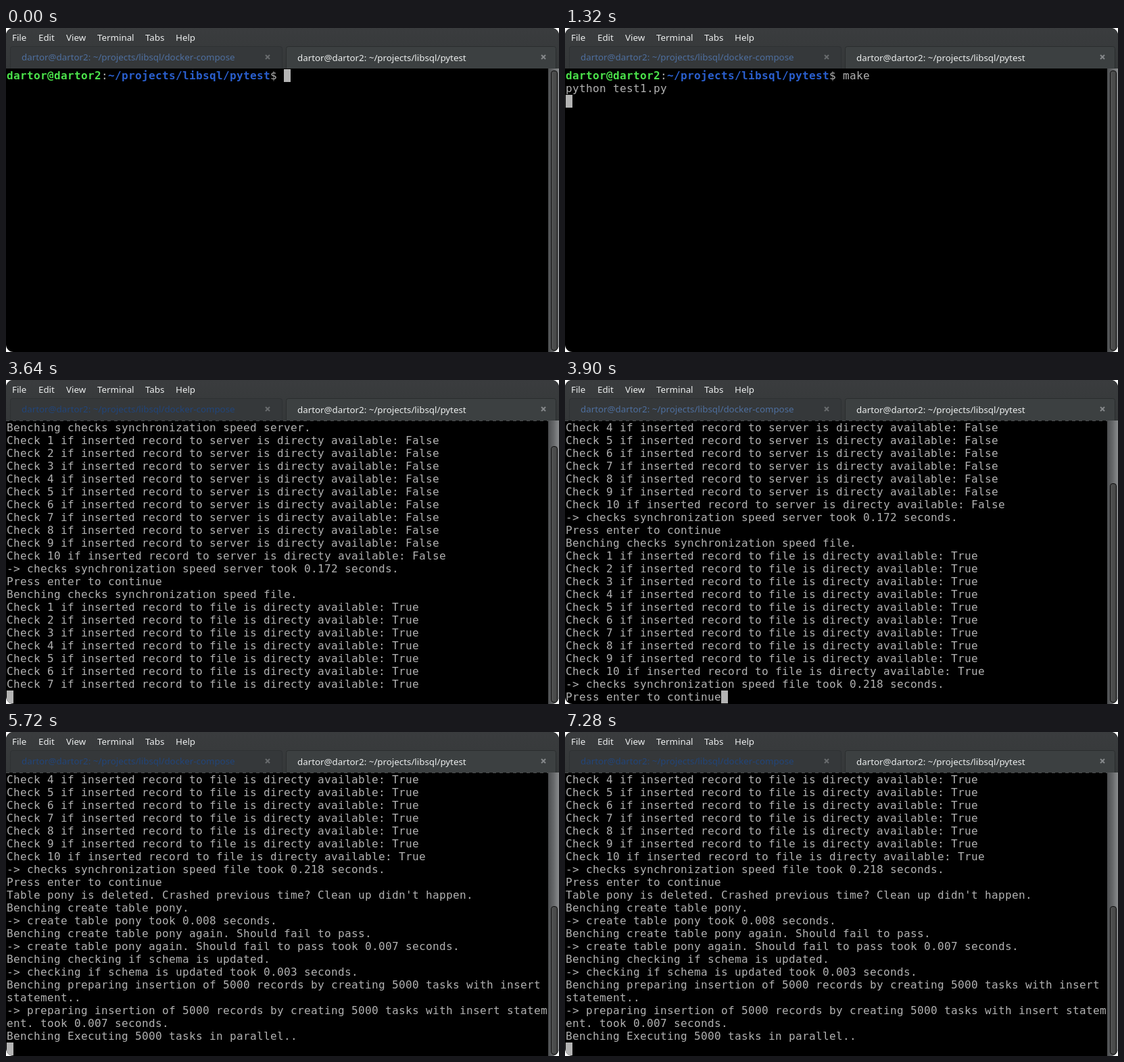
Animation of 818x480 px, one loop 8000 ms. Source, as an HTML page:

```html
<!DOCTYPE html>
<html lang="en">
<head>
<meta charset="utf-8">
<title>Terminal</title>
<style>
  html, body { margin: 0; width: 100%; height: 100%; overflow: hidden; background: #fff; }
  #win { position: absolute; left: 0; top: 0; width: 818px; height: 480px; overflow: hidden; border-radius: 11px; background: #000; }
  #win > * { position: absolute; }
  #head { left: 0; top: 0; font: 13.333px "Noto Sans", sans-serif; fill: #eceeee; }
  #screen { left: 0; top: 61px; width: 802px; height: 419px; overflow: hidden; }
  #log { position: absolute; left: 1px; top: 0; white-space: pre; color: #b2b2b2;
         font: 16px/19px "DejaVu Sans Mono", monospace; }
  #log div { height: 19px; }
  #log b { color: #4be34b; }
  #log b + b, #log .path { color: #2a5fce; }
  #cursor { position: absolute; width: 10px; height: 19px; background: #b4b4b4; }
  #edge { left: 0; top: 60px; width: 802px; height: 1px;
          background: repeating-linear-gradient(90deg, #4a4c4d 0 5px, #0a0a0a 5px 10px); }
  #trough { left: 802px; top: 60px; width: 16px; height: 420px;
            background: linear-gradient(90deg, #4c4e50, #66686a 50%, #8a8c8e); }
  #thumb { left: 806px; width: 10px; box-sizing: border-box; border: 1px solid #0c0c0c;
           border-radius: 4px; background: linear-gradient(90deg, #515252, #454646); }
</style>
</head>
<body>
<div id="win">
  <svg id="head" width="818" height="60">
    <defs>
      <linearGradient id="bar" x2="0" y2="1">
        <stop offset="0" stop-color="#3a3c3e"/>
        <stop offset="1" stop-color="#353839"/>
      </linearGradient>
    </defs>
    <rect width="818" height="60" fill="url(#bar)"/>
    <path d="M6.5 60V30.500q0-3 3-3H405.500q3 0 3 3V60" fill="#35383a" stroke="#2e3133"/>
    <path d="M414.500 60V30.500q0-3 3-3H810.500q3 0 3 3V60" fill="#3c4041" stroke="#2a2d2e"/>
    <text x="9" y="19">File</text>
    <text x="48" y="19">Edit</text>
    <text x="89" y="19">View</text>
    <text x="135" y="19">Terminal</text>
    <text x="206" y="19">Tabs</text>
    <text x="251" y="19">Help</text>
    <text id="idle" x="23" y="48">dartor@dartor2: ~/projects/libsql/docker-compose</text>
    <text x="431" y="49">dartor@dartor2: ~/projects/libsql/pytest</text>
    <path d="M384 40l6 6m0-6l-6 6" stroke="#696c6e" stroke-width="2"/>
    <path d="M792 40l6 6m0-6l-6 6" stroke="#85888a" stroke-width="2"/>
  </svg>
  <div id="screen"><div id="log"></div><div id="cursor"></div></div>
  <div id="edge"></div>
  <div id="trough"></div>
  <div id="thumb"></div>
</div>
<script>
const LOOP = 8000, COLS = 80, ROWS = 22, CELL_W = 10, CELL_H = 19;
const $ = id => document.getElementById(id);
const log = $('log');

const checks = (where, result) => Array.from({ length: 10 }, (_, i) =>
  `Check ${i + 1} if inserted record to ${where} is directy available: ${result}`);
const bench = (name, secs, end = '.', body = []) =>
  [`Benching ${name}${end}`, ...body, `-> ${name} took ${secs} seconds.`];
const pause = 'Press enter to continue';

const output = [
  'python test1.py',
  ...bench('checks synchronization speed server', '0.172', '.', checks('server', 'False')),
  pause,
  ...bench('checks synchronization speed file', '0.218', '.', checks('file', 'True')),
  pause,
  "Table pony is deleted. Crashed previous time? Clean up didn't happen.",
  ...bench('create table pony', '0.008'),
  ...bench('create table pony again. Should fail to pass', '0.007'),
  ...bench('checking if schema is updated', '0.003'),
  ...bench('preparing insertion of 5000 records by creating 5000 tasks with insert statement.', '0.007'),
  'Benching Executing 5000 tasks in parallel..'
].flatMap(s => s.match(new RegExp(`.{1,${COLS}}`, 'g')));

// at: start time, row/col: cursor cell in the whole log, typed: command so far
const steps = [
  { at: 0, row: 0, col: 41, typed: '' },
  { at: 780, row: 0, col: 42, typed: 'm' },
  { at: 1050, row: 0, col: 44, typed: 'mak' },
  { at: 1320, row: 2, col: 0 },
  { at: 1830, row: 14, col: 23, dim: true },
  { at: 3640, row: 23, col: 0, dim: true },
  { at: 3900, row: 27, col: 23 },
  { at: 5720, row: 40, col: 0, dim: true }
];

const prompt = document.createElement('div');
prompt.innerHTML = '<b>dartor@dartor2</b>:<b class="path">~/projects/libsql/pytest</b>$ <span></span>';
const command = prompt.querySelector('span');
const lines = [prompt, ...output.map(text => {
  const line = document.createElement('div');
  line.textContent = text;
  return line;
})];
log.append(...lines);

// Snap the font's advance to the terminal cell
const probe = document.createElement('span');
probe.textContent = '0'.repeat(COLS);
log.append(probe);
log.style.letterSpacing = CELL_W - probe.getBoundingClientRect().width / COLS + 'px';
probe.remove();

function show({ row, col, typed = 'make', dim }) {
  const top = Math.max(0, row - ROWS + 1);
  command.textContent = typed;
  lines.forEach((line, i) => {
    const full = i < row || (i === row && col > 0);
    line.style.visibility = full ? 'visible' : 'hidden';
  });
  log.style.top = -top * CELL_H + 'px';
  $('cursor').style.left = 1 + col * CELL_W + 'px';
  $('cursor').style.top = (row - top) * CELL_H + 'px';
  $('edge').style.visibility = top ? 'visible' : 'hidden';
  const y = Math.round(63 + 420 * top / (top + ROWS));
  $('thumb').style.top = y + 'px';
  $('thumb').style.height = 478 - y + 'px';
  $('idle').style.fill = dim ? '#22457a' : '#4e6f9f';
}

let current;
function tick() {
  const t = performance.now() % LOOP;
  const step = steps.findLast(s => s.at <= t);
  if (step !== current) show(current = step);
  requestAnimationFrame(tick);
}
tick();
</script>
</body>
</html>
```
